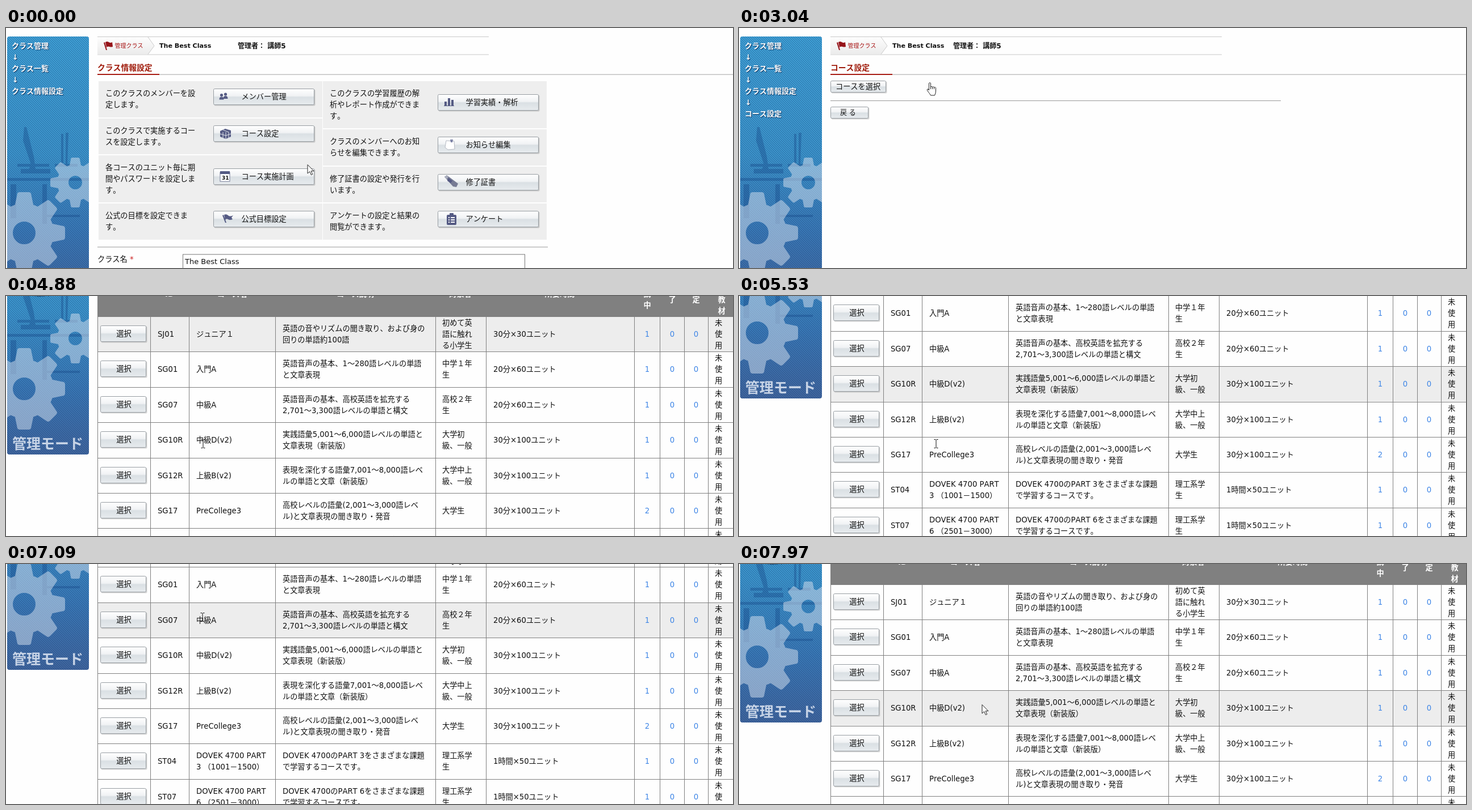
These frames come from a looping animation (1280 by 424 pixels, 8000 ms). An HTML page:

```html
<!DOCTYPE html>
<html lang="ja">
<head>
<meta charset="utf-8">
<title>クラス管理</title>
<style>
html, body { margin: 0; width: 100%; height: 100%; overflow: hidden; background: #fefefe; }
svg { display: block; }
text {
  font: 13.2px "DejaVu Sans", "Noto Sans CJK JP", sans-serif;
  font-kerning: none; text-spacing-trim: space-all; white-space: pre; fill: #111;
}
.m { text-anchor: middle; }
.side { font-weight: bold; font-size: 13px; fill: #fff; text-shadow: 1px 1px 1px #123a66; }
.mode { font-weight: bold; font-size: 25px; fill: #c6d3e6; }
.title { font-weight: bold; font-size: 13.8px; fill: #a01c0c; }
.sub { font-weight: bold; font-size: 12px; fill: #1b7a1f; }
.tag { font-size: 10px; fill: #a81414; }
.cls { font-weight: bold; font-size: 11.1px; }
.adm { font-weight: bold; font-size: 12px; }
.small { font-size: 12px; }
.th { font-weight: bold; fill: #fff; text-anchor: middle; }
.num { fill: #3f86e6; text-anchor: middle; }
</style>
</head>
<body>
<svg id="stage" width="1280" height="424" viewBox="0 0 1280 424"></svg>
<script>
const LOOP = 8000, STEP = 70;
const ROW_TOP = 234, ROW_H = 62.4;
const COLS = [161, 254, 322, 474, 756, 845, 1106, 1151, 1194, 1236];
const SERIES = 'DOVEK 4700';

// [id, name, description, audience, duration, open classes]; "/" breaks a line
const COURSES = [
  ['SJ01', 'ジュニア１', '英語の音やリズムの聞き取り、および身の/回りの単語約100語', '初めて英/語に触れ/る小学生', '30分×30', 1],
  ['SG01', '入門A', '英語音声の基本、1～280語レベルの単語/と文章表現', '中学１年/生', '20分×60', 1],
  ['SG07', '中級A', '英語音声の基本、高校英語を拡充する/2,701～3,300語レベルの単語と構文', '高校２年/生', '20分×60', 1],
  ['SG10R', '中級D(v2)', '実践語彙5,001～6,000語レベルの単語と/文章表現（新装版）', '大学初/級、一般', '30分×100', 1],
  ['SG12R', '上級B(v2)', '表現を深化する語彙7,001～8,000語レベ/ルの単語と文章（新装版）', '大学中上/級、一般', '30分×100', 1],
  ['SG17', 'PreCollege3', '高校レベルの語彙(2,001～3,000語レベ/ル)と文章表現の聞き取り・発音', '大学生', '30分×100', 2],
  ['ST04', SERIES + ' PART/3 （1001－1500）', SERIES + 'のPART 3をさまざまな課題/で学習するコースです。', '理工系学/生', '1時間×50', 1],
  ['ST07', SERIES + ' PART/6 （2501－3000）', SERIES + 'のPART 6をさまざまな課題/で学習するコースです。', '理工系学/生', '1時間×50', 1]
];

// y is the vertical middle of the text block
const text = (x, y, str, cls = '', dy = 5) => {
  const lines = str.split('/');
  return lines.map((s, i) =>
    `<text x="${x}" y="${y + dy + 20 * (i - (lines.length - 1) / 2)}" class="${cls}">${s}</text>`).join('');
};
const rect = (x, y, w, h, fill, more = '') =>
  `<rect x="${x}" y="${y}" width="${w}" height="${h}" fill="${fill}" ${more}/>`;
const path = (d, fill, more = '') => `<path d="${d}" fill="${fill}" ${more}/>`;

const button = (x, y, w, h, label, tx, cls = '') =>
  rect(x + 1.5, y + 1.5, w, h, '#000', 'rx="2" opacity=".16"') +
  rect(x + .5, y + .5, w - 1, h - 1, 'url(#gloss)', 'rx="2" stroke="#979da2"') +
  text(tx, Math.floor(y + h / 2), label, cls);

const heading = (label) => text(161, 70, label, 'title') +
  rect(270, 81.5, 1010, 1.5, '#c2c2c2') + rect(161, 81, 109, 2, '#a81c14');

// Ring with eight tapered, rounded teeth
const gear = (x, y, hole, body, tip, tooth) => {
  const half = tooth / 2, base = half + tooth / 6, r = tooth / 5;
  const d = `M${-base} ${5 - body}L${-half} ${r - tip}Q${-half} ${-tip} ${r - half} ${-tip}` +
    `H${half - r}Q${half} ${-tip} ${half} ${r - tip}L${base} ${5 - body}z`;
  let teeth = '';
  for (let a = 0; a < 360; a += 45) teeth += path(d, '#d2deed', `transform="rotate(${a})"`);
  return `<g transform="translate(${x} ${y})" opacity=".52">${teeth}
    <circle r="${(hole + body) / 2}" fill="none" stroke="#d2deed" stroke-width="${body - hole}"/></g>`;
};

const sidebar = () => {
  const menu = ['クラス管理', 'クラス一覧', 'クラス情報設定', 'コース設定', 'コース選択'];
  const items = menu.map((s, i) => `<g class="item">${i ? text(11, 11 + 40 * i, '↓', 'side') : ''}${text(10, 31 + 40 * i, s, 'side')}</g>`);
  return `<g clip-path="url(#bar)">` + rect(2, 15, 144, 463, 'url(#sea)') +
    `<g fill="#164a8c" opacity=".38">
      <path d="M32 175h4l13 52 3 22-14 6 6-14-14-42z"/><path d="M97 187h4v52h-4zM105 185h5l-2 56h-3z"/>
      <path d="M20 240h56v5H20zM26 249h52v8H26zM86 240h40v5H86z"/>
      <path d="M2 265h144v5H2zM8 276h10v60H8zM64 276h8v70h-8zM70 330h60v4H70z"/></g>` +
    rect(2, 15, 144, 463, 'url(#hatch)') +
    gear(122, 273, 12, 32, 44, 16) + gear(32, 362, 20, 52, 72, 25) + '</g>' +
    text(11, 459, '管理モード', 'mode', 9) + items.join('');
};

const header = () => rect(161, 15, 689, 1, '#c9c9c9') + rect(161, 46.5, 689, 1, '#c9c9c9') +
  path('M161 16H250L261 31.5 250 46.5H161z', 'url(#tab)') +
  path('M250 16L261 31.5 250 46.5', 'none', 'stroke="#c9c9c9"') +
  path('M172 26l2-1 4 14h-2zM175 25q3-2 6 0t6 0l1 8q-3 1-6 0t-5 1z', '#96141a') +
  text(191.5, 31, '管理クラス', 'tag', 4) + text(270, 31, 'The Best Class', 'cls', 4) +
  `<g id="admin">${text(0, 31, '管理者： 講師5', 'adm', 4.5)}</g>`;

const icons = () => {
  const c = '#555b84';
  const person = (x, y) => `<circle cx="${x}" cy="${y}" r="2.6" fill="${c}"/>` +
    path(`M${x - 4} ${y + 8}q0-5 4-5t4 5z`, c);
  return person(379.5, 118.5) + person(386.5, 117) +
    path('M377 182l9-4 10 3v11l-9 4-10-4z', c) +
    path('M377 187l10 3 9-3M382 180l10 4v11M387 184v12M382 184v10', 'none', 'stroke="#dfe3ea"') +
    rect(377, 255, 17, 16, '#fff', 'stroke="#777c98"') + rect(377, 253, 17, 5, c) +
    '<text x="380" y="268" style="font-size:9px;font-weight:bold">31</text>' +
    path('M381 331l2-1 5 14h-2zM384 330q4-2 7 1t9 0l-3 4 2 3q-5 2-8 0t-5 1z', c) +
    rect(772, 130, 4, 7, c) + rect(778, 124, 4, 13, c) + rect(784, 127, 4, 10, c) + rect(771, 137, 18, 1, c) +
    path('M775 199l14 1 1 14-12 1-5-4z', '#fff', 'stroke="#b4b8c2"') + path('M782 197h5l-1 5h-3z', '#7d83a6') +
    path('M772 263l4-3 20 15-3 6-6-1z', '#767b94') + path('M779 265l7 5-3 4-6-4z', c) + path('M772 263l4-3 3 3-3 4z', '#a9adbd') +
    rect(776, 330, 17, 18, c, 'rx="2"') + rect(781, 327, 7, 5, c, 'rx="1"') +
    path('M779 335h2m2 0h7M779 339h2m2 0h7M779 343h2m2 0h7', 'none', 'stroke="#fff" stroke-width="2"');
};

const infoPage = () => {
  // [cell top, cell height, text middle, text, button top, label]
  const left = [
    [94, 64, 125, 'このクラスのメンバーを設/定します。', 107, 'メンバー管理'],
    [160, 63, 191, 'このクラスで実施するコー/スを設定します。', 172, 'コース設定'],
    [225, 83, 266, '各コースのユニット毎に期/間やパスワードを設定しま/す。', 248, 'コース実施計画'],
    [310, 64, 341, '公式の目標を設定できま/す。', 323, '公式目標設定']];
  const right = [
    [94, 83, 135, 'このクラスの学習履歴の解/析やレポート作成ができま/す。', 117, '学習実績・解析'],
    [179, 64, 210, 'クラスのメンバーへのお知/らせを編集できます。', 192, 'お知らせ編集'],
    [245, 63, 276, '修了証書の設定や発行を行/います。', 258, '修了証書'],
    [310, 64, 341, 'アンケートの設定と結果の/閲覧ができます。', 323, 'アンケート']];
  const column = (x, list) => list.map(([y, h, ty, s, by, label]) =>
    rect(x, y, 394, h, '#eee') + text(x + 12, ty, s) +
    button(x + 202, by, 178, 29, label, x + 251.5)).join('');
  return heading('クラス情報設定') + column(163, left) + column(558, right) + icons() +
    rect(161, 386.5, 793, 1, '#999') + text(161, 408, 'クラス名') +
    '<text x="218" y="413" style="fill:#c22">*</text>' +
    rect(311.5, 400, 602, 30, '#fff', 'stroke="#777"') +
    '<text x="315" y="417" style="font-size:13px">The Best Class</text>';
};

const setupPage = () => heading('コース設定') +
  button(161, 93, 98, 21, 'コースを選択', 170) + rect(161, 128, 793, 1, '#999') +
  button(161, 139, 67, 21, '戻 る', 178, 'small');

const listPage = () => {
  const heads = [[288, 194, 'ID'], [398, 194, 'コース名'], [615, 194, 'コース説明'], [800, 194, '対象者'],
    [975, 194, '所要時間'], [1171, 143, '使用中クラス数'], [1129, 194, '開/講/中'],
    [1173, 194, '終/了'], [1215, 194, '予/定'], [1260, 194, '自/習/教/材']];
  const rows = COURSES.map(([id, name, desc, who, time, open], i) => {
    const y = Math.round(ROW_TOP + ROW_H * i), m = y + 31;
    return rect(161, y, 1119, ROW_H, '#fefefe', 'class="row"') + rect(161, y, 1119, 1, '#808080') +
      button(166, y + 16, 81, 29, '選択', 207.5, 'm') +
      text(267, m, id) + text(335, m, name) + text(487, m, desc) + text(768, m, who) +
      text(858, m, time + 'ユニット') + text(1129, m, String(open), 'num') +
      text(1173, m, '0', 'num') + text(1215, m, '0', 'num') + text(1248, m, '未/使/用');
  }).join('');
  return heading('コース選択') + text(161, 99, 'ビルトインコース', 'sub') +
    rect(270, 107, 1010, 1.5, '#cfcfcf') + rect(161, 107, 109, 2, '#1f8a24') +
    text(161, 122, '全25件 50件表示') + rect(161, 133, 1119, 101, '#808080') +
    heads.map(([x, y, s]) => text(x, y, s, 'th')).join('') + rows +
    COLS.map(x => rect(x, ROW_TOP, 1, ROW_H * COURSES.length, '#808080')).join('');
};

const cursors = {
  arrow: path('M0 .5V16L3.7 12.6 6.3 18.5 8.7 17.5 6.2 11.7H11z', '#fff', 'stroke="#222"'),
  hand: path('M-1.5 1.5q1.5-2 3 0V8q1.5-1.5 3 .3 1.7-1.3 3 .5 2.4-1 3 1V15q0 4-2 8H1.5C0 20-3 17-4.8 13.5q0-2.2 2-1.5l1.3 2z' +
    'M1.5 8v4M4.5 8.5v3.5M7.5 9v3', '#fff', 'stroke="#222"'),
  beam: path('M-3.5-7.5h2.5l1 1 1-1h2.5M0-6.5V6.5M-3.5 7.5h2.5l1-1 1 1h2.5', 'none', 'stroke="#111"')
};

const stage = document.getElementById('stage');
stage.innerHTML = `<defs>
  <linearGradient id="gloss" x2="0" y2="1"><stop stop-color="#fff"/><stop offset=".45" stop-color="#f0f2f4"/>
    <stop offset=".52" stop-color="#dae0e4"/><stop offset="1" stop-color="#e7ebee"/></linearGradient>
  <linearGradient id="tab" x2="0" y2="1"><stop stop-color="#fdfdfd"/><stop offset="1" stop-color="#ebebeb"/></linearGradient>
  <linearGradient id="sea" x2="0" y2="1"><stop stop-color="#42a8dd"/><stop offset=".45" stop-color="#3f9bd2"/>
    <stop offset=".75" stop-color="#3d7cba"/><stop offset="1" stop-color="#4468a0"/></linearGradient>
  <pattern id="hatch" width="4" height="4" patternUnits="userSpaceOnUse">
    <path d="M-1-1L5 5M3-1L5 1M-1 3L1 5" stroke="#143c72" stroke-width="1.1" opacity=".5"/></pattern>
  <clipPath id="bar"><rect x="2" y="15" width="144" height="463" rx="4"/></clipPath></defs>
  <g id="view">${sidebar()}${header()}
    ${[infoPage, setupPage, listPage].map(f => `<g class="page">${f()}</g>`).join('')}</g>
  <circle id="click" cx="475" cy="192" r="25" fill="#ff0" opacity=".47"/>
  <g id="mouse">${Object.keys(cursors).map(k => `<g id="${k}">${cursors[k]}</g>`).join('')}</g>`;

// [time, value]
const PAGE = [[0, 0], [1200, 1], [3600, 2]];
const SCROLL = [[0, 0], [4530, 36], [4600, 84], [4670, 99], [4810, 150], [4880, 198],
  [5390, 234], [5460, 283], [5530, 297], [7090, 291], [7160, 264], [7230, 228], [7300, 204], [7390, 198]];
// The hovered row catches up with the scroll a little later
const HOVER = [[0, 0], [5180, 198], [5740, 297], [7600, 198]];
// [start, steps, x, y, cursor on the way, cursor on arrival]
const MOVES = [
  [0, 1, 531, 241, 'arrow', 'arrow'],
  [70, 10, 475, 192, 'arrow', 'hand'],
  [1340, 10, 249, 106, 'arrow', 'hand'],
  [3040, 1, 336, 96, 'hand', 'hand'],
  [3110, 3, 706, 2, 'arrow', 'arrow'],
  [3320, 1, 640, 20, '', ''],
  [3670, 10, 347, 261, 'arrow', 'beam'],
  [6020, 12, 347, 133, 'beam', 'beam'],
  [6880, 3, 346, 94, 'beam', 'beam'],
  [7600, 6, 428, 248, 'arrow', 'arrow']
];

const $ = id => document.getElementById(id);
const all = sel => [...stage.querySelectorAll(sel)];
const pages = all('.page'), items = all('.item'), rows = all('.row');
const show = (node, on) => { node.style.display = on ? '' : 'none'; };
const at = (table, t) => table.filter(r => r[0] <= t).pop()[1];

function pointer(t) {
  const i = MOVES.filter(m => m[0] <= t).length - 1;
  const [start, steps, x, y, way, end] = MOVES[i];
  const [, , x0, y0] = MOVES[Math.max(0, i - 1)];
  const k = Math.min(1, (Math.floor((t - start) / STEP) + 1) / steps);
  const p = k * k * (3 - 2 * k);
  return { x: x0 + (x - x0) * p, y: y0 + (y - y0) * p, shape: p > .85 ? end : way };
}

function draw(t) {
  const page = at(PAGE, t), mouse = pointer(t);
  pages.forEach((g, i) => show(g, i === page));
  items.forEach((g, i) => show(g, i < 3 + page));
  $('admin').setAttribute('transform', `translate(${page === 1 ? 377 : 408} 0)`);
  $('view').setAttribute('transform', `translate(0 ${-at(SCROLL, t)})`);
  const over = Math.floor((mouse.y + at(HOVER, t) - ROW_TOP) / ROW_H);
  rows.forEach((r, i) => r.setAttribute('fill', i === over ? '#ededed' : '#fefefe'));
  show($('click'), t >= 990 && t < 1060);
  $('mouse').setAttribute('transform', `translate(${Math.round(mouse.x)} ${Math.round(mouse.y)})`);
  Object.keys(cursors).forEach(k => show($(k), k === mouse.shape));
}

const born = performance.now();
function tick() {
  draw((performance.now() - born) % LOOP);
  requestAnimationFrame(tick);
}
tick();
</script>
</body>
</html>
```
